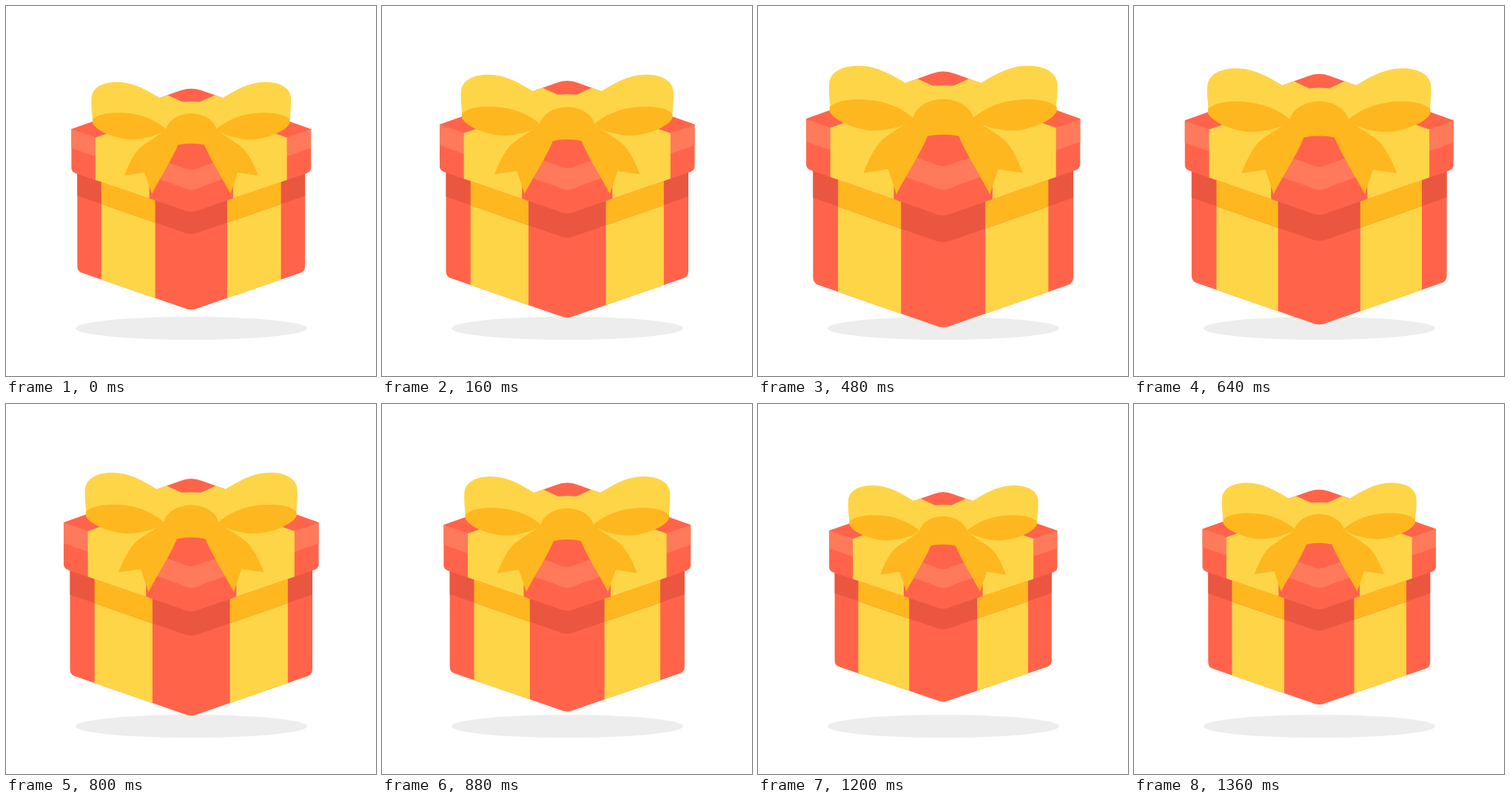
Recreate the animation shown at these times as an HTML page without scripts. Size 500 by 500 pixels, loop 1.44 s.

```html
<!DOCTYPE html>
<html lang="en">
<head>
<meta charset="utf-8">
<title>Pulsing gift box</title>
<style>
@property --turn { syntax: "<angle>"; inherits: true; initial-value: 0deg; }
@keyframes beat { to { --turn: 360deg; } }

html, body { margin: 0; width: 100%; height: 100%; overflow: hidden; background: #fff; }
svg {
  display: block; width: 100%; height: 100%;
  --swell: calc(.385 + .81 * cos(var(--turn) - 120deg));
  animation: beat 1440ms steps(18) -1ms infinite;
}

/* Parts near the middle swell more than the outer ones; nested parts add to their parent */
.bulge {
  transform-origin: 0 0;
  transform: scale(calc(1 + var(--x) * var(--swell)), calc(1 + var(--y) * var(--swell)));
}
.box { --x: .117; --y: .122; }
.box-wrap { --x: .02; --y: .03; }
.lid { --x: .118; --y: .137; }
.lid-wrap { --x: .025; --y: .01; }
.loops { --x: .118; --y: .122; }
.loop-insides { --x: .125; --y: .14; }
.knot { --x: .154; --y: .154; }

.red { fill: #ff644b; }
.dark { fill: #eb5640; }
.light { fill: #ff7a5b; }
.yellow { fill: #ffd548; }
.orange { fill: #ffb71f; }
</style>
</head>
<body>
<svg viewBox="0 0 500 500">
  <!-- Every part is drawn as a left half and mirrored -->
  <defs>
    <clipPath id="box-outline">
      <path id="box-half" d="M.5 -45 H-154.25 V102 Q-154.25 109 -147.5 111 L-10 158.3 Q-5 160.7 .5 160.7 Z"/>
      <use href="#box-half" transform="scale(-1 1)"/>
    </clipPath>
    <clipPath id="lid-outline">
      <path id="lid-half" d="M.5 -139 Q-6 -139 -14 -136.3 L-162.25 -84 V-31 Q-162.25 -26 -156.5 -24 L-12 25.3 Q-6 28.3 .5 28.3 Z"/>
      <use href="#lid-half" transform="scale(-1 1)"/>
    </clipPath>
  </defs>

  <ellipse cx="250.5" cy="435.5" rx="156.5" ry="15.5" fill="#ededed"/>

  <g transform="translate(250.25 250)">
    <g class="bulge box" clip-path="url(#box-outline)">
      <rect class="red" x="-170" y="-60" width="340" height="240"/>
      <g class="bulge box-wrap">
        <g id="box-wrap">
          <path class="yellow" d="M-121.75 -40 H-48.75 V170 H-121.75 Z"/>
          <path class="dark" d="M-180 -60 V-2.4 L-10 56.2 Q-5 58.3 .5 58.3 V-60 Z"/>
          <path class="orange" d="M-121.75 -40 V17.7 L-48.75 42.8 V-40 Z"/>
        </g>
        <use href="#box-wrap" transform="scale(-1 1)"/>
      </g>
    </g>

    <g class="bulge lid" clip-path="url(#lid-outline)">
      <rect class="red" x="-170" y="-150" width="340" height="190"/>
      <g class="bulge lid-wrap">
        <g id="lid-wrap">
          <path class="light" d="M-180 -90 L-13 -32.3 Q-6 -28.5 .5 -28.5 V-1.5 Q-6 -1.5 -13 -5.5 L-180 -64.5 Z"/>
          <path class="yellow" d="M-129.75 -72.5 L-70 -93 L-43 -127 L-32 -130 L-12 -120.8 Q-6 -121.3 .5 -121.3 V-72 L-56.75 -52 V40 H-129.75 Z"/>
        </g>
        <use href="#lid-wrap" transform="scale(-1 1)"/>
      </g>
    </g>

    <g class="bulge loops yellow">
      <path id="loop" d="M-133.5 -92 C-133.5 -100 -136 -114 -135 -127 C-133.5 -141 -119 -147.7 -100 -147.7 C-78 -147.7 -59 -136 -42 -125.7 L-30 -85 Z"/>
      <use href="#loop" transform="scale(-1 1)"/>
    </g>
    <g class="bulge loop-insides orange">
      <path id="loop-inside" d="M-133.5 -97 C-124 -107 -100 -107 -84 -105.2 C-62 -102.5 -46 -94 -33 -83 C-50 -73 -68 -70 -82 -69.8 C-100 -70.5 -128 -80 -133.5 -92 Z"/>
      <use href="#loop-inside" transform="scale(-1 1)"/>
    </g>
    <g class="bulge knot orange">
      <path id="tail" d="M.5 -105 C-18 -105 -32 -95 -34.5 -83 C-48 -72 -60 -67 -70 -58 C-78 -50 -85 -36 -91 -20.7 L-63 -25 L-53.3 3.7 C-45 -13 -24 -46 -18 -62.5 Q-10 -64.5 .5 -64.5 Z"/>
      <use href="#tail" transform="scale(-1 1)"/>
    </g>
  </g>
</svg>
</body>
</html>
```
